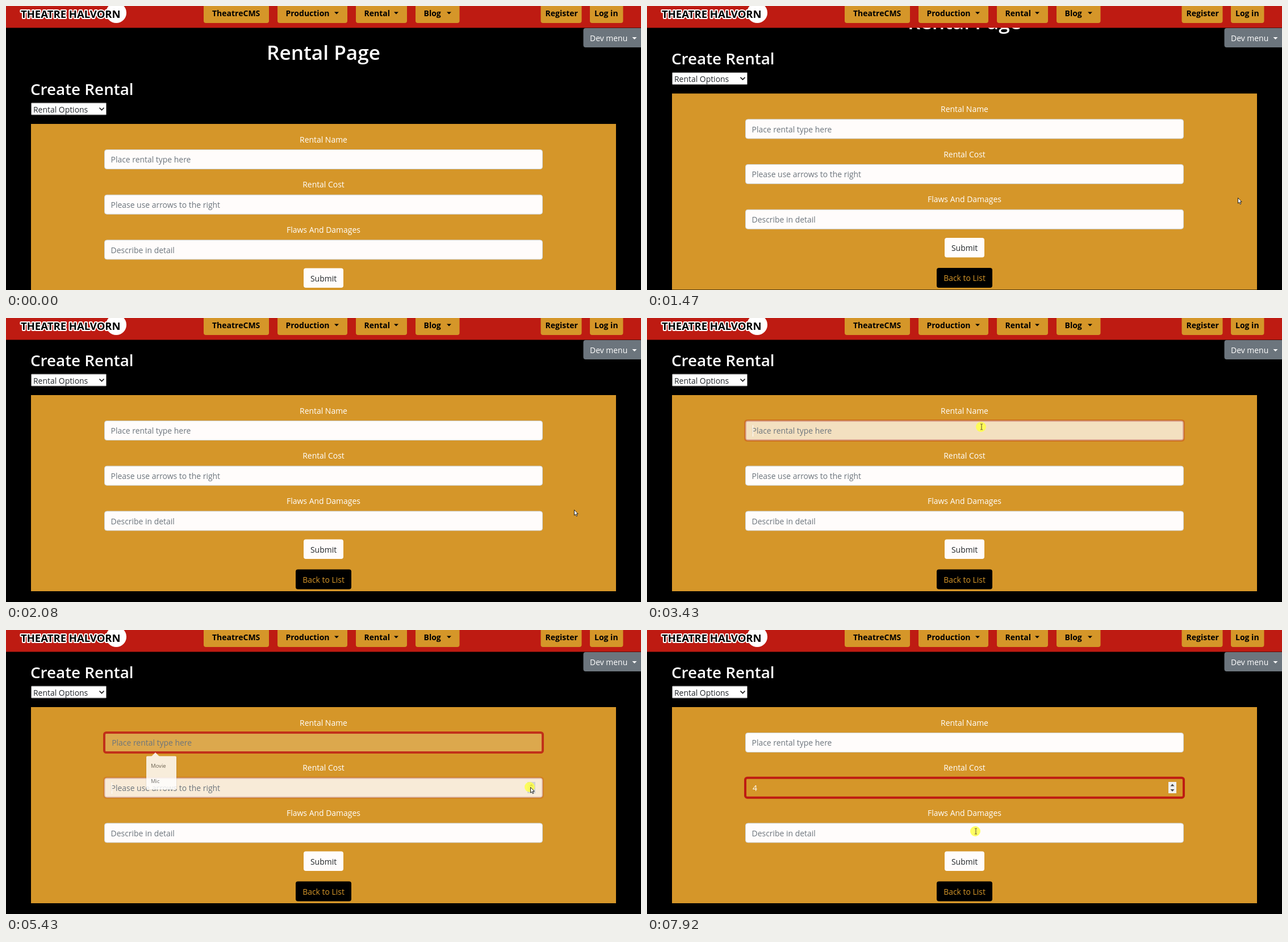
An HTML page for the animation above (7990 ms loop, 1118 by 501 pixels).

```html
<!DOCTYPE html>
<html lang="en">
<head>
<meta charset="utf-8">
<title>Rental Page</title>
<style>
html, body { margin: 0; width: 100%; height: 100%; overflow: hidden; background: #000; }
svg { display: block; width: 100%; height: 100%; font: 13.95px "Open Sans", "Noto Sans", sans-serif; }
text { white-space: pre; fill: #fff; }
.h1 { font-size: 35.2px; font-weight: 600; }
.h2 { font-size: 27.8px; font-weight: 600; }
.mid { text-anchor: middle; }
.nav { font-size: 14px; font-weight: 700; fill: #000; }
.brand { font-size: 18.5px; font-weight: 700; fill: #000; stroke: #fff; stroke-width: 4px; stroke-linejoin: round; paint-order: stroke; }
.hint { fill: #6c757d; }
.dark { fill: #212529; }
.gold { fill: #d59629; }
.small { font-size: 9.5px; fill: #555; }
</style>
</head>
<body>
<svg id="stage" viewBox="0 0 1118 501" xmlns="http://www.w3.org/2000/svg"></svg>
<script>
const LOOP = 7990;
const GOLD = '#d59629', RED = '#be1b12', PAPER = '#fffcfb', GREY = '#6c757d';
const stage = document.getElementById('stage');

function add(parent, tag, attrs, text) {
  const el = document.createElementNS('http://www.w3.org/2000/svg', tag);
  set(el, attrs);
  if (text) el.textContent = text;
  return parent.appendChild(el);
}
function set(el, attrs) {
  for (const k in attrs) el.setAttribute(k, attrs[k]);
}
const group = parent => add(parent, 'g', {});
const box = (p, x, y, width, height, fill, rx = 0, more = {}) =>
  add(p, 'rect', { x, y, width, height, fill, rx, ...more });
const label = (p, x, y, cls, text) => add(p, 'text', { x, y, class: cls }, text);
const shape = (p, d, fill, more = {}) => add(p, 'path', { d, fill, ...more });
const show = (el, on) => set(el, { opacity: +on });

// Scrolling page, laid out at its final scroll position
const page = group(stage);
label(page, 559, 23, 'h1 mid', 'Rental Page');
label(page, 43, 85, 'h2', 'Create Rental');
box(page, 44.5, 99, 132, 21, '#fff', 1, { stroke: '#767676' });
label(page, 48, 115.6, 'dark', 'Rental Options');
shape(page, 'M164.5 107.5l4 4 4-4', 'none', { stroke: '#111', 'stroke-width': 1.6 });
box(page, 44, 136, 1030, 346, GOLD);

function field(y, title, hint) {
  label(page, 559, y - 12.5, 'mid', title);
  const frame = box(page, 173.5, y + 0.5, 771, 34, PAPER, 4, { stroke: '#ced4da' });
  const ring = box(page, 173, y, 772, 35, 'none', 3.5, { stroke: RED, 'stroke-width': 4 });
  const text = label(page, 184.5, y + 23.4, 'hint', hint);
  return { y, frame, ring, text };
}
const nameField = field(181, 'Rental Name', 'Place rental type here');
const costField = field(260.7, 'Rental Cost', 'Please use arrows to the right');
const flawField = field(340.4, 'Flaws And Damages', 'Describe in detail');
show(flawField.ring, false);
const value = label(page, 186, 284.1, '', '');
const caret = box(page, 186, 189, 1, 20, '#fff');

const spinner = group(page);
const spinBack = box(spinner, 918, 268, 14, 20, '#efefef');
shape(spinner, 'M921.5 275.5l3.5-4 3.5 4zM921.5 281l3.5 4 3.5-4z', '#444');

box(page, 524, 390.5, 70, 34.5, PAPER, 4);
label(page, 559, 413.6, 'dark mid', 'Submit');
box(page, 510, 443.5, 98, 35, '#000', 4);
label(page, 559, 467, 'gold mid', 'Back to List');

// Fixed header
box(stage, 0, 0, 1118, 38.5, RED);
add(stage, 'circle', { cx: 194, cy: 12, r: 18, fill: '#fff' });
label(stage, 26, 21, 'brand', 'THEATRE HALVORN');
const arrowDown = (x, y, fill) => shape(stage, `M${x} ${y}h8l-4 4z`, fill);
[
  [348, 463, 363, 'TheatreCMS'],
  [478, 601, 492.5, 'Production', 578],
  [616, 706, 630.5, 'Rental', 683],
  [721, 798.5, 735.5, 'Blog', 776],
  [941.5, 1013.5, 949.5, 'Register'],
  [1028, 1086.5, 1036, 'Log in']
].forEach(([x1, x2, tx, text, mark]) => {
  box(stage, x1, -8, x2 - x1, 38, GOLD, 4);
  label(stage, tx, 18, 'nav', text);
  if (mark) arrowDown(mark, 10.5, '#000');
});
box(stage, 1016.5, 39, 106, 34, GREY, 4);
label(stage, 1028, 62.4, '', 'Dev menu');
arrowDown(1102.5, 55, '#fff');

// Suggestion list
const popup = group(stage);
box(popup, 246, 223, 55, 60, '#000', 2, { opacity: 0.08 });
box(popup, 247, 222.5, 53, 59, '#fff', 2);
shape(popup, 'M256 223l7-7 7 7z', '#fff');
label(popup, 255, 243, 'small', 'Movie');
label(popup, 255, 269.6, 'small', 'Mic');

// Pointer
const halo = add(stage, 'circle', { r: 9, fill: '#ffff46', 'fill-opacity': 0.85 });
const arrow = shape(stage, 'M.5.5v9.6l2.2-2 1.6 3.6 1.6-.7-1.6-3.5h2.9z', '#fff',
  { stroke: '#111', 'stroke-width': 0.9 });
const beam = shape(stage, 'M-2-5h1.5l.5.6.5-.6h1.5M0-4.4v8.8M-2 5h1.5l.5-.6.5.6h1.5', 'none',
  { stroke: '#5c4a30', 'stroke-width': 1 });

// Bursts of change: start, end, steps
const bursts = [
  [580, 720, 3], [1250, 1810, 9], [2080, 2550, 8], [2810, 2950, 3], [3100, 3100, 1],
  [3370, 3560, 4], [3890, 3890, 1], [4350, 4480, 3], [4680, 5100, 7], [5430, 5640, 4],
  [5970, 6240, 5], [6500, 7240, 11], [7310, 7920, 9]
];
const scrollKeys = [
  [1180, 0], [1250, 5.3], [1320, 21], [1390, 39], [1460, 53.6],
  [1530, 62.5], [1600, 67.5], [1670, 70.3], [1740, 71.5], [1810, 72]
];
const pointerKeys = [
  [580, 1050, 429], [650, 1043, 362], [720, 1040, 338], [2010, 1040, 338], [2080, 1000, 338],
  [2215, 800, 306], [2350, 630, 268], [2416, 568, 253], [2483, 570, 210], [2550, 580, 188],
  [2740, 580, 188], [2950, 589, 191], [3100, 589, 192], [4285, 589, 192], [4480, 594, 192],
  [4610, 594, 192], [4680, 629, 204], [4750, 626, 283], [4820, 690, 312], [4890, 790, 312],
  [4960, 870, 296], [5030, 912, 282], [5100, 923, 277], [5900, 923, 277], [6037, 927, 266],
  [6105, 929, 267], [6240, 929, 274], [7090, 929, 274], [7240, 926, 288], [7310, 900, 298],
  [7462, 745, 328], [7615, 615, 351], [7767, 580, 355], [7920, 579, 355]
];
const clicks = [[3370, 3500], [5430, 5570], [6500, 6570], [6700, 6780], [6860, 6940], [7010, 7090], [7840, 7990]];
const caretOn = [[3370, 3890], [4400, 4940], [5430, 5970], [6500, 7620]];
const counts = [6500, 6700, 6860, 7010];

const within = (list, t) => list.some(([a, b]) => t >= a && t < b);
const ramp = (t, a, b) => Math.min(1, Math.max(0, (t - a) / (b - a)));

function hold(t) {
  let out = 0;
  for (const [start, end, steps] of bursts) {
    if (t < start) break;
    const gap = (end - start) / (steps - 1) || 1;
    out = Math.min(end, start + Math.floor((t - start) / gap + 0.001) * gap);
  }
  return out;
}
function track(keys, t) {
  const i = keys.findIndex(k => k[0] > t);
  if (i === 0) return keys[0].slice(1);
  if (i < 0) return keys[keys.length - 1].slice(1);
  const a = keys[i - 1], b = keys[i], p = ramp(t, a[0], b[0]);
  return a.slice(1).map((v, n) => v + (b[n + 1] - v) * p);
}
function focus(f, amount) {
  set(f.frame, { 'fill-opacity': 1 - amount, 'stroke-opacity': 1 - amount });
  show(f.ring, 0);
  set(f.ring, { opacity: amount });
  set(f.text, { x: 184.5 + (amount > 0.5 ? 1.7 : 0) });
}

function draw(time) {
  const t = hold(time);
  const [scroll] = track(scrollKeys, t);
  set(page, { transform: `translate(0 ${72 - scroll})` });

  const leave = ramp(t, 5400, 5580);
  focus(nameField, ramp(t, 3320, 3500) * (1 - leave));
  focus(costField, leave);
  set(popup, { opacity: ramp(t, 3400, 3550) * (1 - leave) });

  const count = counts.filter(c => t >= c).length;
  value.textContent = count || '';
  show(costField.text, !count);
  show(caret, within(caretOn, t));
  set(caret, { x: count ? 194 : 186, y: t < 5430 ? 189 : 269 });

  const [x, y] = track(pointerKeys, t);
  const over = f => x > 173 && x < 945 && y > f.y && y < f.y + 35;
  const onSpin = over(costField) && x > 915;
  const text = t >= 2470 && !onSpin && [nameField, costField, flawField].some(over);
  show(spinner, t >= 5430 || (t > 4700 && over(costField)));
  set(spinBack, { fill: onSpin ? '#d3d3d3' : '#efefef' });

  show(arrow, t >= 580 && !text);
  show(beam, text);
  show(halo, within(clicks, t));
  set(arrow, { transform: `translate(${x} ${y})` });
  set(beam, { transform: `translate(${x} ${y})` });
  set(halo, { cx: x - 1, cy: y });
}

const begin = performance.now();
function tick() {
  draw((performance.now() - begin) % LOOP);
  requestAnimationFrame(tick);
}
tick();
</script>
</body>
</html>
```
